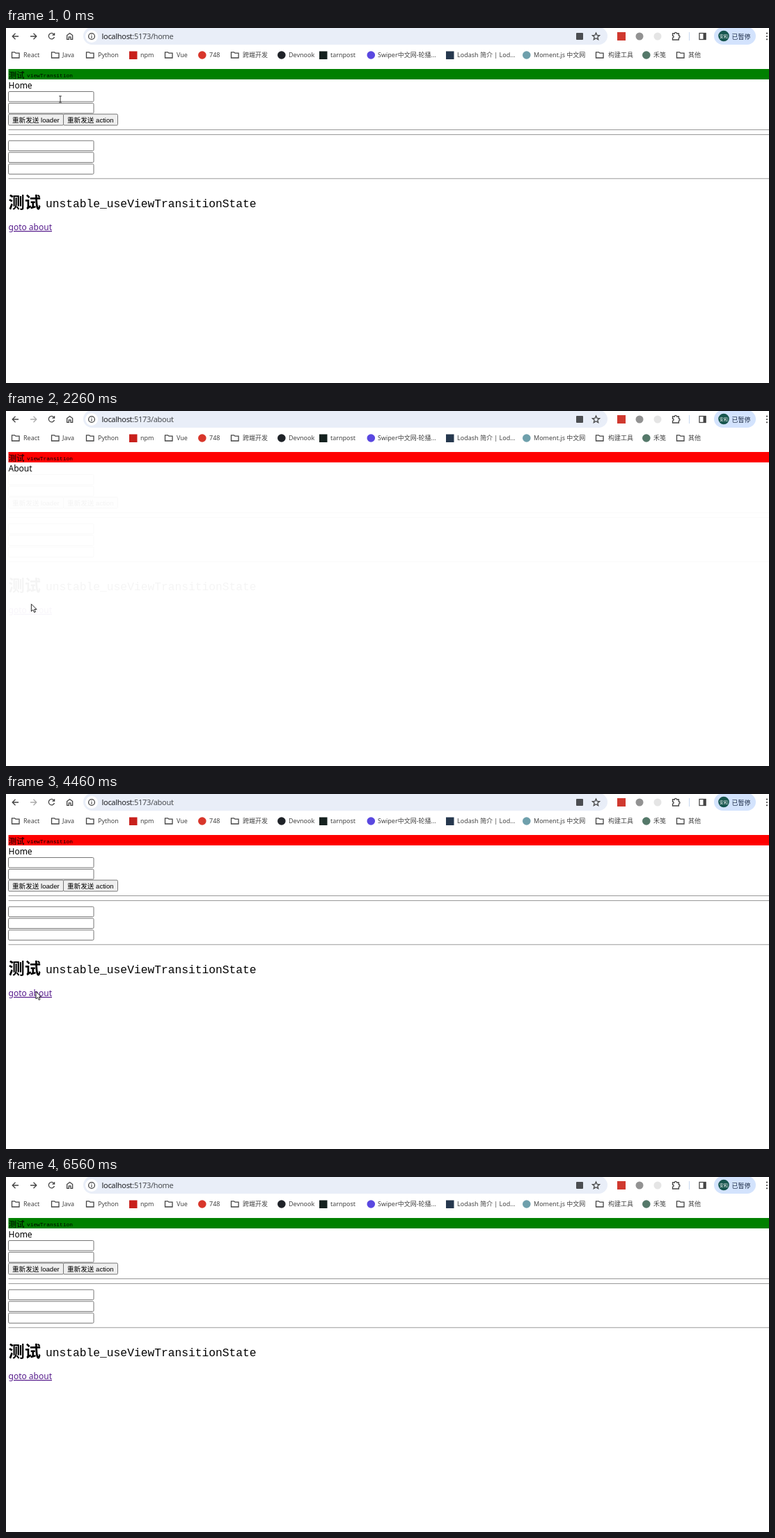
These frames come from a looping animation (1096x511 px, 7.15 s). An HTML page:

```html
<!DOCTYPE html>
<html lang="zh">
<head>
<meta charset="utf-8">
<title>viewTransition</title>
<style>
  html, body { margin: 0; width: 100%; height: 100%; overflow: hidden; background: #fff; }
  svg { display: block; width: 100vw; height: 100vh; }
  text { font-family: "Noto Sans", "Noto Sans CJK SC", "Noto Sans CJK", sans-serif; white-space: pre; }
  .ui { font-size: 9px; fill: #444; }
  .url { font-size: 11px; letter-spacing: -.3px; fill: #4a4d52; }
  .body { font-size: 12px; }
  .btn { font: 9.6px "Liberation Sans", "Noto Sans CJK SC", "Noto Sans CJK", sans-serif; }
  .mono { font-family: "Liberation Mono", monospace; }
  .icon { fill: none; stroke: #444; stroke-width: 1.3; }
  .rule { stroke: #999; }
</style>
</head>
<body>
<svg viewBox="0 0 1096 511" preserveAspectRatio="none">
  <g id="hovers"></g>
  <g class="icon">
    <path d="M18 12H9.5M13.5 7.7L9.2 12L13.5 16.3"/>
    <path id="forward" d="M35 12H43.5M39.5 7.7L43.8 12L39.5 16.3"/>
    <path d="M69 9.3A4.2 4.2 0 1 0 69.5 13M69.6 7.2V10.2H66.4"/>
    <path d="M87.6 16.3V10.6L91.6 7.6L95.6 10.6V16.3H92.9V12.8H90.3V16.3Z"/>
  </g>

  <rect x="111" y="-1" width="753" height="25" rx="12.5" fill="#e9eef8"/>
  <circle cx="123" cy="12" r="9" fill="#fff"/>
  <circle class="icon" cx="123" cy="12" r="4.4"/>
  <path d="M123 11.4V14.5M123 9.4V10.5" stroke="#444" stroke-width="1.2"/>
  <text x="137.5" y="16" class="url"><tspan fill="#1f2023">localhost</tspan><tspan id="path"></tspan></text>
  <rect x="819" y="7" width="10" height="10" rx="1" fill="#4b4d51"/>
  <path class="icon" d="M847.5 7L849 10.4L852.6 10.7L849.8 13.1L850.7 16.7L847.5 14.8L844.3 16.7L845.2 13.1L842.4 10.7L846 10.4Z" stroke-width="1.1"/>

  <rect x="878" y="6" width="12" height="12" fill="#d0392f"/>
  <circle cx="910" cy="12" r="5.5" fill="#929292"/>
  <circle cx="936" cy="12" r="5.5" fill="#e5e5e5"/>
  <path class="icon" d="M957.5 8H960.4A1.6 1.6 0 0 1 963.6 8H966.4V11A1.6 1.6 0 0 1 966.4 14.2V17H957.5V14.2A1.6 1.6 0 0 0 957.5 11Z"/>
  <path d="M981.5 6V18" stroke="#c8d8f0"/>
  <rect class="icon" x="996" y="7.5" width="9" height="9"/>
  <rect x="1001.5" y="7" width="4" height="10" fill="#444"/>
  <rect x="1017" y="-1" width="60" height="25" rx="12.5" fill="#d3e3fd"/>
  <circle cx="1031" cy="11.5" r="7.8" fill="#17564f"/>
  <text x="1031" y="13.8" font-size="6" fill="#fff" text-anchor="middle">安和</text>
  <text x="1042.5" y="15.5" font-size="9" fill="#1c2b45">已暂停</text>
  <g fill="#444"><circle cx="1093" cy="7.7" r="1.1"/><circle cx="1093" cy="12" r="1.1"/><circle cx="1093" cy="16.3" r="1.1"/></g>
  <g id="bookmarks"></g>

  <g id="page">
    <rect id="band" x="3.5" y="59" width="1093" height="15"/>
    <text x="3.5" y="71.5" font-size="11.6">测试</text>
    <text x="30" y="71" class="mono" font-size="7.85">viewTransition</text>
    <text id="about" class="body" x="3.5" y="86.5">About</text>
    <g id="home">
      <text class="body" x="3.5" y="86.5">Home</text>
      <g id="fields" fill="#fff" stroke="#767676"></g>
      <g fill="#efefef" stroke="#767676">
        <rect x="3.5" y="124" width="79" height="16" rx="1.5"/>
        <rect x="82.5" y="124" width="78" height="16" rx="1.5"/>
      </g>
      <text class="btn" x="9" y="135.6">重新发送 loader</text>
      <text class="btn" x="88" y="135.6">重新发送 action</text>
      <path class="rule" d="M3.5 146.5H1096M3.5 153.5H1096M3.5 216.8H1096"/>
      <text x="3.5" y="258.5" font-size="23.2" font-weight="700">测试</text>
      <text x="57" y="257.5" class="mono" font-size="16.28">unstable_useViewTransitionState</text>
      <text class="body" x="3.5" y="291" fill="#551a8b" text-decoration="underline">goto about</text>
    </g>
  </g>

  <g id="cursor" stroke-linejoin="round">
    <path id="arrow" d="M0 0V10.5L2.5 8.3L4.2 12L6 11.2L4.4 7.6H7.6Z" fill="#fff" stroke="#111" stroke-width=".9"/>
    <path id="hand" d="M-1 8V1Q0 -.6 1 1V5L5 5.8Q6.6 6.2 6.3 8L5.4 12.8H-.6L-3.8 8.4Q-3.6 6.8 -2.3 7.4Z" fill="#fff" stroke="#111" stroke-width=".9"/>
    <path id="beam" d="M-1.8 -4H1.8M0 -4V5M-1.8 5H1.8" fill="none" stroke="#222" stroke-width=".9"/>
  </g>
</svg>
<script>
const LOOP = 7150, STEP = 70, FADE = 250;
const $ = id => document.getElementById(id);

// [kind, icon left, text left, label, colour]
const BOOKMARKS = [
  ['folder', 8, 25, 'React'], ['folder', 65, 81, 'Java'], ['folder', 115, 132, 'Python'],
  ['square', 177, 193, 'npm', '#c8201c'], ['folder', 228, 245, 'Vue'],
  ['circle', 276, 292, '748', '#d8362b'], ['folder', 323, 340, '跨端开发'],
  ['circle', 390, 406, 'Devnook', '#1f2328'], ['square', 450, 466, 'tarnpost', '#15211f'],
  ['circle', 518.5, 534, 'Swiper中文网-轮播...', '#5a48e0'],
  ['square', 632, 648, 'Lodash 简介 | Lod...', '#26384e'],
  ['circle', 742, 758, 'Moment.js 中文网', '#6fa0ac'],
  ['folder', 847, 865, '构建工具'], ['circle', 914, 930, '禾笺', '#55796a'],
  ['folder', 963, 980, '其他']
];
const ICONS = {
  folder: x => `<path class="icon" stroke-width="1.2" d="M${x + .5} 34.8H${x + 4.5}L${x + 6} 36.2H${x + 11}V43H${x + .5}Z"/>`,
  square: (x, c) => `<rect x="${x}" y="33.5" width="11.5" height="11.5" fill="${c}"/>`,
  circle: (x, c) => `<circle cx="${x + 5.8}" cy="39" r="5.8" fill="${c}"/>`
};
$('bookmarks').innerHTML = BOOKMARKS.map(([kind, x, tx, label, c]) =>
  ICONS[kind](x, c) + `<text class="ui" x="${tx}" y="42.3">${label}</text>`).join('');
$('fields').innerHTML = [91.5, 108.3, 162.2, 179, 195.8].map(y =>
  `<rect x="3.5" y="${y}" width="122.5" height="14.5" rx="1.5"/>`).join('');
const BUTTONS = [13, 39, 65, 91];
$('hovers').innerHTML = BUTTONS.map(x => `<circle cx="${x}" cy="12" r="12.5"/>`).join('');

// Pointer path: time, x, y, shape
const PATH = [
  [0, 78, 102, 'beam'], [70, 78, 101, 'beam'], [140, 77, 95, 'arrow'],
  [560, 63, 16, 'arrow'], [840, 63, 16, 'arrow'], [1330, 48, 334, 'arrow'],
  [1500, 38, 292, 'hand'], [1730, 37, 290.5, 'hand'], [1930, 37, 290, 'arrow'],
  [2150, 37, 289, 'arrow'], [2600, 24, 60, 'arrow'], [2870, 8, 16, 'arrow'],
  [3430, 8, 16, 'arrow'], [4020, 42, 300, 'arrow'], [4170, 42, 299, 'arrow'],
  [4240, 43, 286, 'hand'], [4380, 43, 284.5, 'arrow'], [4600, 43, 284.5, 'arrow'],
  [5150, 8, 10, 'arrow'], [5750, 8, 10, 'arrow'], [6330, 660, 348, 'arrow'],
  [6490, 932, 496, 'arrow']
];
const ANCHORS = [0, 840, 1590, 1930, 2660, 3430, 4170, 4920, 5680, 6420];

const clamp = v => Math.min(1, Math.max(0, v));
const ease = v => v * v * (3 - 2 * v);
const fade = (t, start) => ease(clamp((t - start) / FADE));
const within = (t, spans) => spans.some(([a, b]) => t >= a && t < b);
const hold = t => {
  const base = ANCHORS.findLast(a => a <= t);
  return base + Math.floor((t - base) / STEP) * STEP;
};

function pointer(t) {
  const i = PATH.findLastIndex(k => k[0] <= t);
  const a = PATH[i], b = PATH[i + 1] || a;
  const k = b === a ? 0 : ease((t - a[0]) / (b[0] - a[0]));
  return { x: a[1] + (b[1] - a[1]) * k, y: a[2] + (b[2] - a[2]) * k, shape: a[3] };
}

function draw(time) {
  const t = hold(time);
  const onAbout = within(t, [[1930, 3360], [4390, 5540]]);
  const busy = within(t, [[1930, 2250], [3360, 3720], [4390, 4730], [5540, 5820]]);
  const pressed = within(t, [[600, 900], [3340, 3600], [5500, 5800]]);

  $('path').textContent = ':5173/' + (onAbout ? 'about' : 'home');
  $('forward').style.stroke = onAbout ? '#aaa' : '#444';
  $('band').setAttribute('fill', busy ? '#f00' : '#008000');

  const home = 1 - fade(t, 1990) + fade(t, 3430) - fade(t, 4460) + fade(t, 5558);
  $('home').setAttribute('opacity', home);
  $('about').setAttribute('opacity', 1 - home);
  $('page').setAttribute('opacity', t < 630 ? 1 : fade(t, 735));

  const { x, y, shape } = pointer(t);
  $('cursor').setAttribute('transform', `translate(${x} ${y})`);
  $('cursor').style.display = t < 6560 ? '' : 'none';
  for (const id of ['arrow', 'hand', 'beam']) $(id).style.display = id === shape ? '' : 'none';

  BUTTONS.forEach((cx, i) => {
    const over = Math.abs(x - cx) < 13 && y < 25 && !(i === 1 && onAbout);
    $('hovers').children[i].setAttribute('fill', !over ? 'none' : pressed ? '#dedede' : '#f0f0f0');
  });
}

const start = performance.now();
function tick() {
  draw((performance.now() - start) % LOOP);
  requestAnimationFrame(tick);
}
tick();
</script>
</body>
</html>
```
